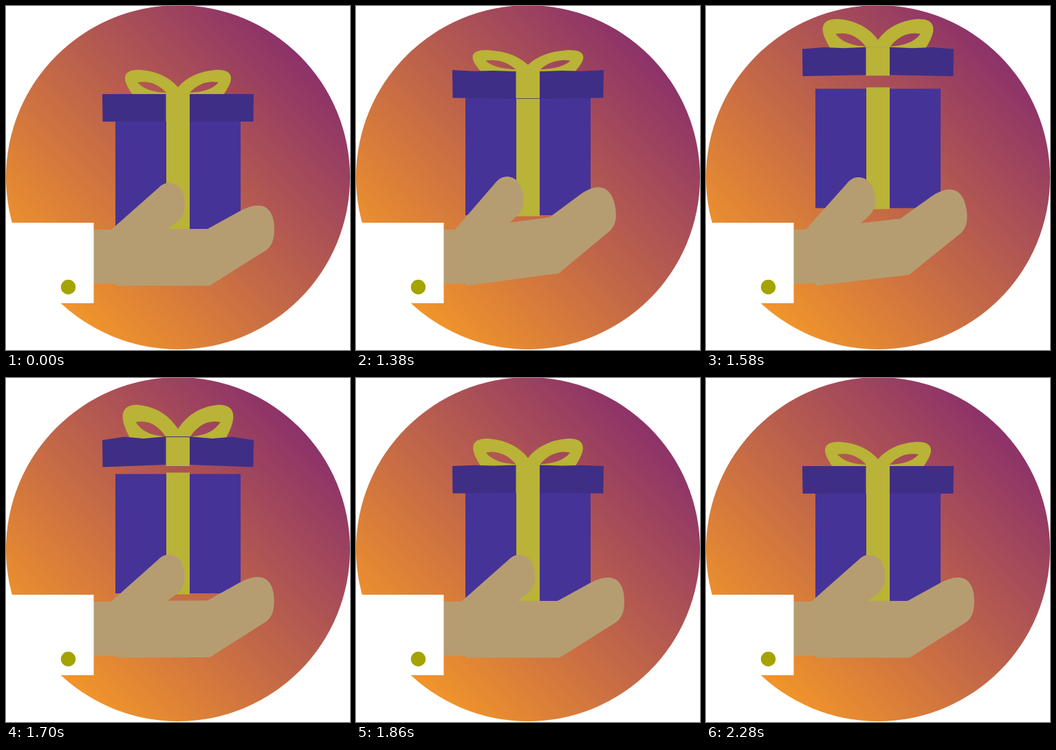
An HTML page for the animation above (6000 ms loop, 500 by 500 pixels).

```html
<!DOCTYPE html>
<html lang="en">
<head>
<meta charset="utf-8">
<title>Gift in hand</title>
<style>
  html, body { margin: 0; width: 100%; height: 100%; overflow: hidden; background: #fff; }
  svg { display: block; width: 100%; height: 100%; }
  .ribbon { fill: #b9b337; }
  .skin { fill: #b69d71; }
</style>
</head>
<body>
<svg viewBox="0 0 500 500">
  <defs>
    <linearGradient id="sunset" gradientUnits="userSpaceOnUse" x1="73" y1="426" x2="427" y2="72">
      <stop offset="0" stop-color="#f1952b"/>
      <stop offset="1" stop-color="#8c3269"/>
    </linearGradient>
  </defs>
  <circle cx="250" cy="249" r="250" fill="url(#sunset)"/>

  <g id="box">
    <path d="M159 151H341V324.5H159Z" fill="#463397"/>
    <path class="ribbon" d="M233 149H267V326H233Z"/>
  </g>

  <g id="lid">
    <g id="half">
      <path id="bow" class="ribbon" fill-rule="evenodd"
        d="M184 129C178 120 173 112 173 105C173 95 184 92 196 93C220 95 238 104 250 118V129Z
           M191 111C208 108 222 114 233 126C214 125 200 121 191 111Z"/>
      <path id="flap" fill="#3f2e86"/>
    </g>
    <use href="#half" transform="translate(500) scale(-1 1)"/>
    <path class="ribbon" d="M232.5 126H267V168H232.5Z"/>
  </g>

  <path class="skin" d="M127 325H160V403.5H127Z"/>
  <path id="hand" class="skin"
    d="M160 406.5H296L378 355C386 349 390 340 390 325C390 300 380 290 366 290C358 290 350 293 342 297
       L293 324H235L250 313C258 306 260 298 260 287C260 268 250 257 237 257C231 257 226 260 222 264L153 325Z"/>
  <path d="M0 315H127.5V432H0Z" fill="#fff"/>
  <circle cx="90.5" cy="408.5" r="10.7" fill="#a5a300"/>
</svg>
<script>
  const LOOP = 6000;
  const [box, lid, bow, flap, hand] =
    ['box', 'lid', 'bow', 'flap', 'hand'].map(id => document.getElementById(id));

  // Keyframes are [time in ms, value], joined by sine easing.
  const handTilt = [[1200, 0], [1380, -7.6], [1540, -7.6], [1720, 0]];
  const boxLift = [[1200, 0], [1520, -34], [1820, 0]];
  const lidLift = [[1200, 0], [1560, -67.5], [1880, 0]];
  const bowStretch = [[1200, 1], [1380, 0.85], [1720, 1.4], [1980, 0.9], [2130, 1.04], [2280, 1]];

  function valueAt(keys, time) {
    const next = keys.findIndex(key => key[0] > time);
    if (next === 0) return keys[0][1];
    if (next < 0) return keys[keys.length - 1][1];
    const [t0, v0] = keys[next - 1], [t1, v1] = keys[next];
    const eased = (1 - Math.cos(Math.PI * (time - t0) / (t1 - t0))) / 2;
    return v0 + (v1 - v0) * eased;
  }

  const shiftY = (node, y) => node.setAttribute('transform', `translate(0 ${y})`);

  function draw(time) {
    const stretch = valueAt(bowStretch, time);
    const bend = (stretch - 1) * 6;
    const widen = 1 + 0.045 * Math.min(1, Math.abs(stretch - 1) * 7);

    shiftY(box, valueAt(boxLift, time));
    shiftY(lid, valueAt(lidLift, time));
    bow.setAttribute('transform',
      `translate(250 128) scale(${widen} ${stretch}) translate(-250 -128)`);
    flap.setAttribute('d', `M140 ${128 + bend}L172 ${128 - bend}L200 128L233 ${128 - 1.3 * bend}H250
      V${168 - 0.8 * bend}H233L140.5 ${168 + 0.6 * bend}Z`);
    hand.setAttribute('transform', `rotate(${valueAt(handTilt, time)} 160 406)`);
  }

  const start = performance.now();
  function frame() {
    draw((performance.now() - start) % LOOP);
    requestAnimationFrame(frame);
  }
  frame();
</script>
</body>
</html>
```
